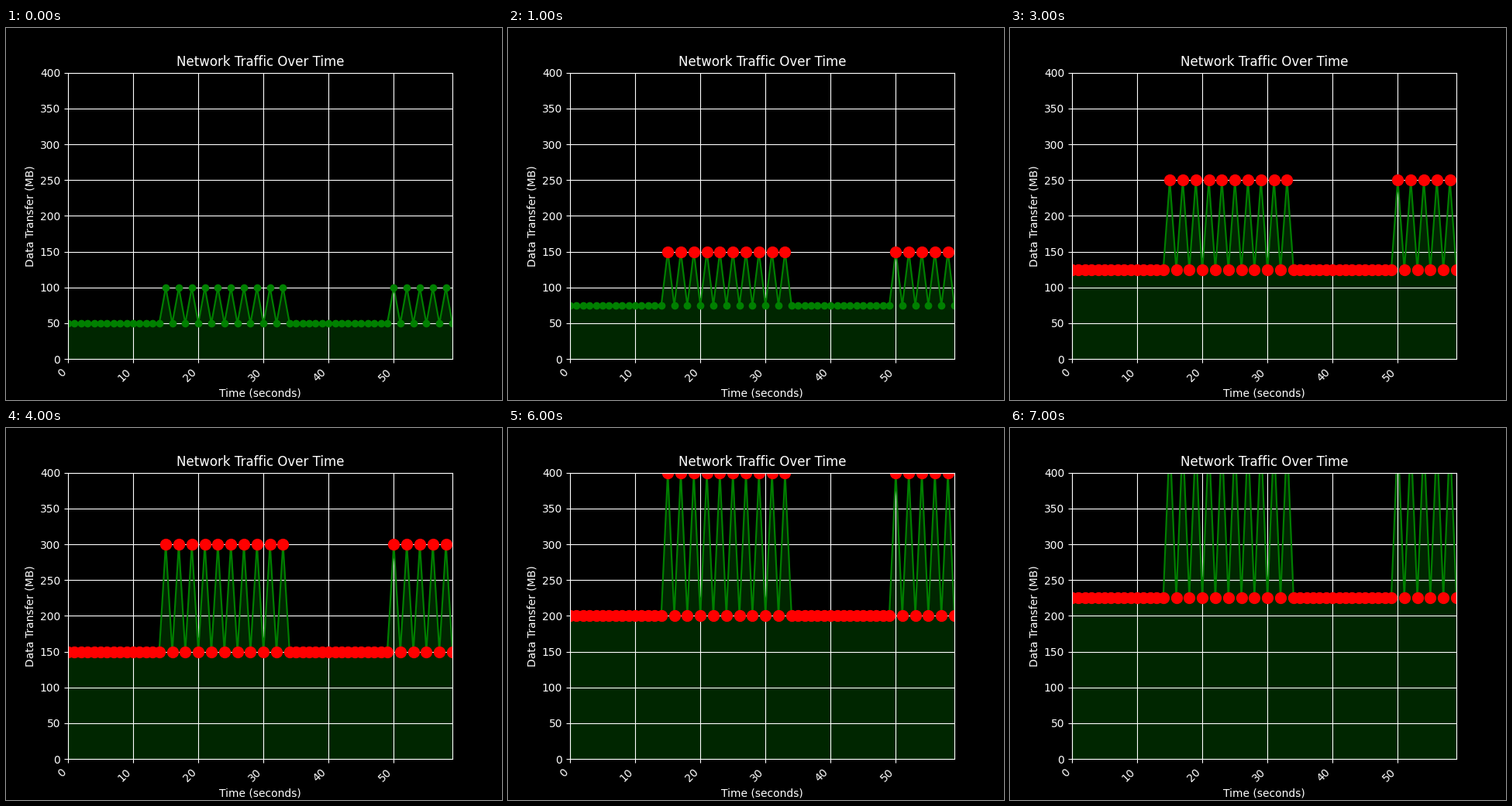
Recreate the animation shown at these times as a matplotlib script. Size 640x480 px, loop 8000 ms.

```python
import numpy as np
import matplotlib.pyplot as plt
from matplotlib.animation import FuncAnimation

STEPS = 8
STEP_MS = 1000
ALERT = 100  # MB; anything above is flagged red

plt.style.use("dark_background")
fig, ax = plt.subplots(figsize=(6.4, 4.8), dpi=100)

seconds = np.arange(60)
first_burst = (seconds >= 15) & (seconds <= 33) & (seconds % 2 == 1)
second_burst = (seconds >= 50) & (seconds % 2 == 0)
load = np.where(first_burst | second_burst, 2, 1)


def draw(step):
    traffic = (50 + 25 * step) * load
    high = traffic > ALERT

    ax.clear()
    ax.fill_between(seconds, traffic, color="green", alpha=0.3)
    ax.plot(seconds, traffic, color="green", marker="o")
    ax.plot(seconds[high], traffic[high], "o", color="red", markersize=10)

    ax.set_xlim(0, 59)
    ax.set_ylim(0, 400)
    ax.set_title("Network Traffic Over Time")
    ax.set_xlabel("Time (seconds)")
    ax.set_ylabel("Data Transfer (MB)")
    ax.grid(True)
    plt.setp(ax.get_xticklabels(), rotation=45, ha="right")
    return ax.get_children()


anim = FuncAnimation(fig, draw, frames=STEPS, interval=STEP_MS,
                     init_func=lambda: draw(0), repeat=True, repeat_delay=0)
plt.show()
```
